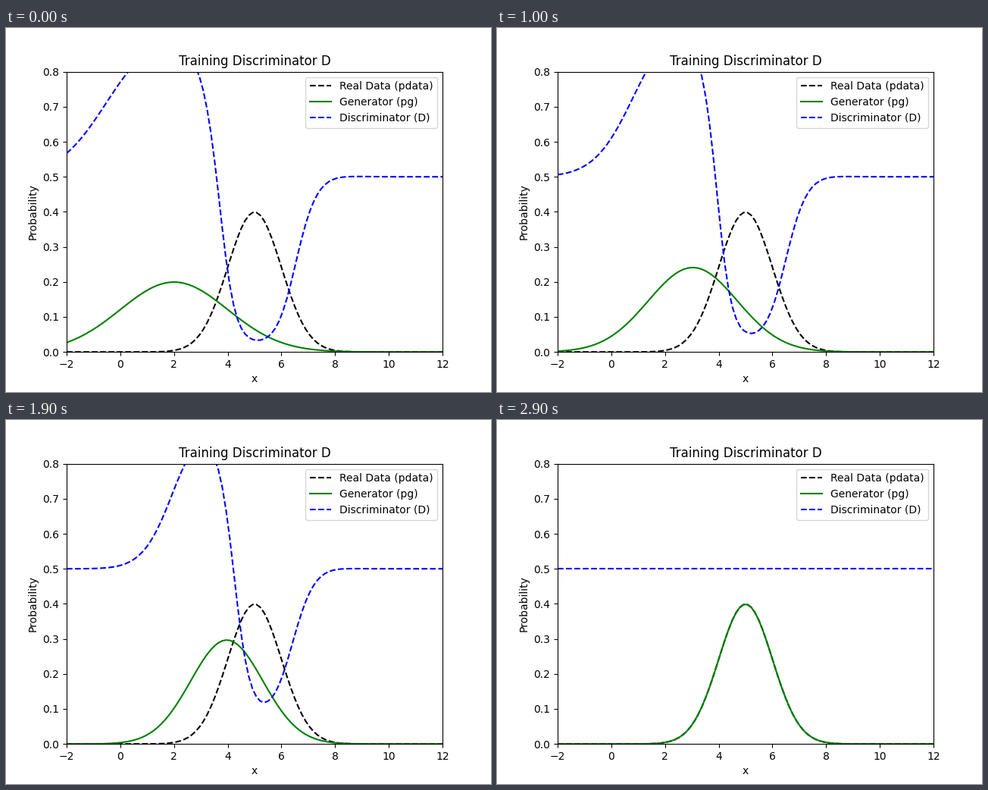
Write a matplotlib script that moves like this. It is 640 by 480 pixels and loops after 3 s.

```python
import numpy as np
import matplotlib.pyplot as plt
from matplotlib.animation import FuncAnimation

FRAMES = 30
INTERVAL = 100  # ms

REAL_MEAN, REAL_STD = 5, 1
START_MEAN, START_STD = 2, 2
SHARPNESS = 10

x = np.linspace(-2, 12, 100)


def normal_pdf(x, mean, std):
    return np.exp(-0.5 * ((x - mean) / std) ** 2) / (std * np.sqrt(2 * np.pi))


def sigmoid(z):
    return 1 / (1 + np.exp(-z))


real = normal_pdf(x, REAL_MEAN, REAL_STD)

plt.rcParams["font.family"] = "DejaVu Sans"
fig, ax = plt.subplots(figsize=(6.4, 4.8), dpi=100)
ax.set_xlim(-2, 12)
ax.set_ylim(0, 0.8)
ax.set_xlabel("x")
ax.set_ylabel("Probability")
ax.set_title("Training Discriminator D")

ax.plot(x, real, "--", color="black", label="Real Data (pdata)")
gen_line, = ax.plot([], [], "-", color="green", label="Generator (pg)")
disc_line, = ax.plot([], [], "--", color="blue", label="Discriminator (D)")
ax.legend(loc="upper right")


def update(frame):
    # The generator drifts linearly onto the real distribution.
    t = frame / (FRAMES - 1)
    mean = START_MEAN + (REAL_MEAN - START_MEAN) * t
    std = START_STD + (REAL_STD - START_STD) * t
    generated = normal_pdf(x, mean, std)
    gen_line.set_data(x, generated)
    disc_line.set_data(x, sigmoid(SHARPNESS * (generated - real)))
    return gen_line, disc_line


anim = FuncAnimation(fig, update, frames=FRAMES, interval=INTERVAL,
                     init_func=lambda: update(0), repeat=True, repeat_delay=0)
plt.show()
```
